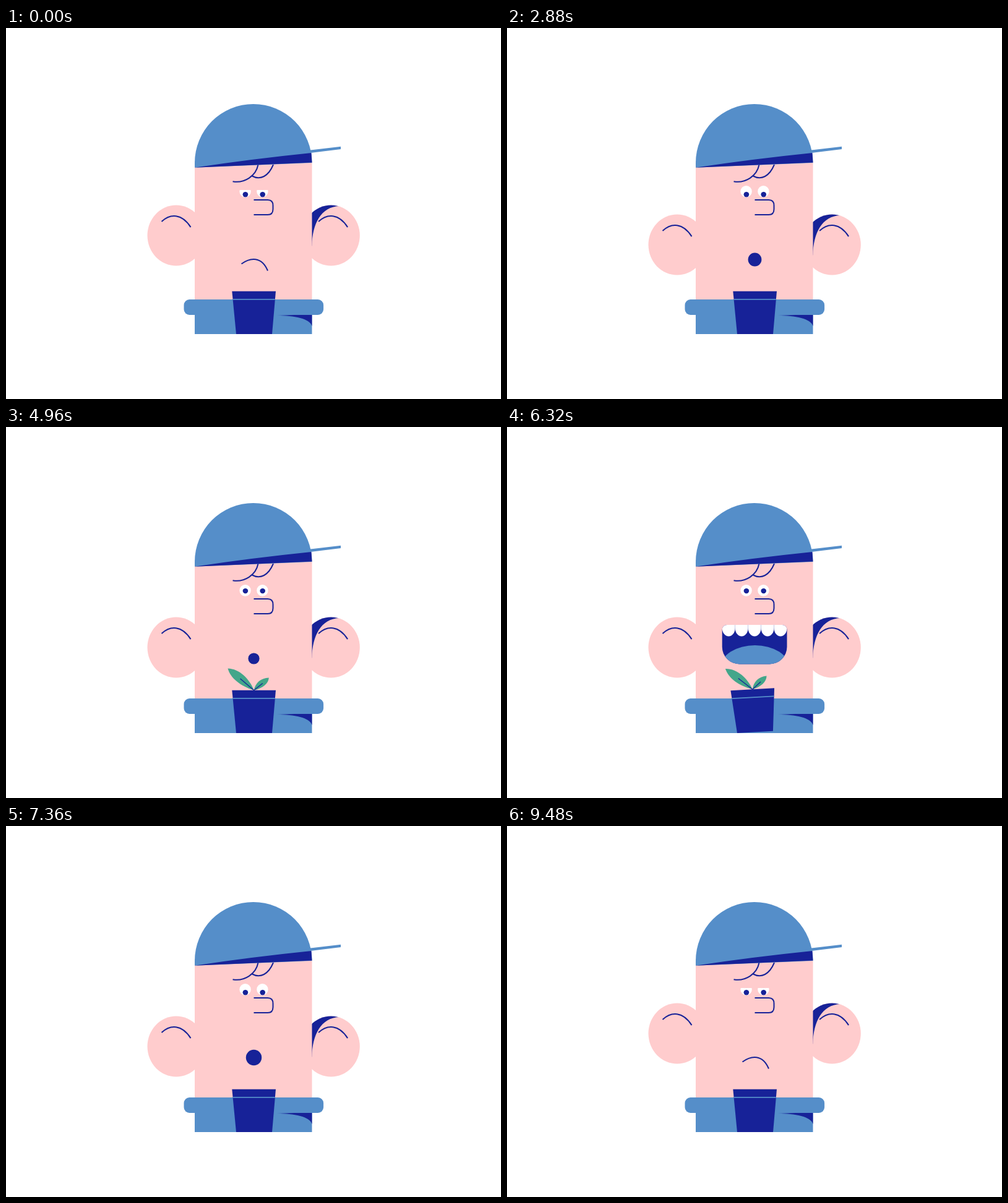
Write an HTML page with a canvas that moves like this. It is 800 by 600 pixels and loops after 9600 ms.

```html
<!DOCTYPE html>
<html lang="en">
<head>
<meta charset="utf-8">
<title>Boy and plant</title>
<style>
  html, body { margin: 0; width: 100%; height: 100%; overflow: hidden; background: #fff; }
  canvas { display: block; }
</style>
</head>
<body>
<canvas id="stage" width="800" height="600"></canvas>
<script>
const ctx = document.getElementById('stage').getContext('2d');
const LOOP = 9600, STEP = 40, TAU = 2 * Math.PI;
const SKIN = '#ffcccd', BLUE = '#558ec9', NAVY = '#172298', GREEN = '#43a68a', WHITE = '#fff';
const BLINKS = [490, 3240, 6840], RATTLES = [1500, 2120, 3120, 7400, 7720];
let now = 0;

const mix = (a, b, p) => a + (b - a) * p;
const span = (start, end) => Math.min(1, Math.max(0, (now - start) / (end - start)));
const sum = (list, f) => list.reduce((total, item) => total + f(item), 0);

// Motion rules: eased step 0..1, single bump, full wave, damped swing.
function go(start, end) {
  const p = span(start, end);
  return p < .5 ? 4 * p ** 3 : 1 - 4 * (1 - p) ** 3;
}
const bump = (start, length) => Math.sin(Math.PI * span(start, start + length));
const wave = (start, length, turns) => Math.sin(TAU * turns * span(start, start + length));
function swing(start) {
  const age = Math.max(0, now - start);
  return Math.exp(-age / 400) * Math.sin(TAU * age / 480);
}

function fill(path, color) {
  ctx.fillStyle = color;
  ctx.fill(new Path2D(path));
}
function stroke(path, color = NAVY, width = 2) {
  ctx.strokeStyle = color;
  ctx.lineWidth = width;
  ctx.stroke(new Path2D(path));
}
function ellipse(x, y, rx, ry, color) {
  ctx.beginPath();
  ctx.ellipse(x, y, rx, ry, 0, 0, TAU);
  ctx.fillStyle = color;
  ctx.fill();
}
function roundRect(x, y, w, h, radii, color) {
  ctx.beginPath();
  ctx.roundRect(x, y, w, h, radii);
  ctx.fillStyle = color;
  ctx.fill();
}
function local(draw) {
  ctx.save();
  draw();
  ctx.restore();
}

function ear(x, lineShift, shaded) {
  const drop = 15 * go(1060, 1960) + 6 * go(2960, 3640) - 21 * go(7340, 8080);
  const height = 49 - bump(3600, 320);
  local(() => {
    ctx.translate(x, 335.6 + drop);
    ellipse(0, 0, 46.5, height, SKIN);
    if (shaded) local(() => {
      ctx.clip();
      fill('M-31 17C-30 -20 -16 -46 13 -47.5L0 -60H-60V17Z', NAVY);
    });
    ctx.translate(lineShift, 0);
    stroke('M-23.5 -22.5C-9.5 -35.6 9 -35.8 23.5 -13.5');
  });
}

function eyes() {
  const open = go(900, 1280) - go(9080, 9480);
  const lid = mix(262 - 8 * open, 274, sum(BLINKS, start => bump(start, 190)));
  const lookUp = go(3400, 3520) - bump(5240, 320) - go(6880, 6960) + go(8000, 8160) - go(8480, 8640);
  local(() => {
    ctx.translate(0, 264.4);
    ctx.scale(1, 1 + .36 * bump(1080, 400));
    ctx.translate(0, -264.4);
    for (const x of [386.6, 414.4]) {
      ellipse(x, 264.4, 9.2, 9.3, WHITE);
      ellipse(x + .3, 269.2 - 4.1 * lookUp, 4.3, 4.2, NAVY);
    }
    ctx.fillStyle = SKIN;
    ctx.fillRect(376, 250, 49, lid - 250);
  });
}

function mouth() {
  if (now < 2480 || now >= 8960) return stroke('M380.5 381.5C395 371 413 369 423 392.5');
  const r = 12.7 * go(2400, 2640) - 3.6 * go(2640, 3120) + 3.6 * go(6600, 7080);
  const open = go(5440, 5880) - go(6680, 7040);
  const x = mix(400.5 - r, 347.7, open), y = mix(374.5 - r, 320, open);
  const w = mix(2 * r, 104.8, open), h = mix(2 * r, 63.5, open);
  const top = mix(r, 8, open), bottom = mix(r, 28, open);
  local(() => {
    roundRect(x, y, w, h, [top, top, bottom, bottom], NAVY);
    if (!open) return;
    ctx.clip();
    ctx.translate(x, y);
    ctx.scale(w / 104.8, h / 63.5);
    ellipse(53, 68 + 40 * (1 - open), 55, 35, BLUE);
    ctx.translate(0, -20 * (1 - open));
    for (let i = 0; i < 5; i++) fill(`M${i * 20.96} 0v5a10.48 13.6 0 0 0 20.96 0v-5Z`, WHITE);
  });
}

function leaf(shape, vein, angle, size) {
  local(() => {
    ctx.rotate(angle * Math.PI / 180);
    ctx.scale(size, size);
    fill(shape, GREEN);
    stroke(vein, NAVY, 1.3);
  });
}

function plantPot() {
  const tilt = 2 * sum(RATTLES, start => wave(start, 320, 2)) - 3.2 * wave(6160, 640, 1);
  const stretch = 1 - .07 * bump(3420, 180) + .058 * bump(3600, 320) - .04 * bump(3920, 160);
  const grown = go(3580, 3740) - go(6640, 6840);
  const perk = 10 * swing(3640) + 6 * swing(5160);
  const pivot = tilt < 0 ? 372 : 430;
  local(() => {
    ctx.translate(pivot, 495 - 7 * bump(3600, 320));
    ctx.rotate(tilt * Math.PI / 180);
    ctx.scale(1, stretch);
    ctx.translate(-pivot, -495);
    if (grown > 0) local(() => {
      ctx.translate(400.7, 425.8);
      leaf('M0 0C-7 -18 -23 -35 -42 -35.5C-38 -20 -22 -7 0 0Z', 'M0 0L-22 -19', perk, grown);
      leaf('M0 0C2 -12 11 -20 24 -20.5C23.5 -11 14 -3.5 0 0Z', 'M0 0L14 -11.5', -perk, grown);
    });
    fill('M365.3 425.7H436L430 495H372Z', NAVY);
    stroke('M366.5 438.8H434.8', BLUE, 1.8);
  });
}

function scene() {
  ctx.fillStyle = WHITE;
  ctx.fillRect(0, 0, 800, 600);
  ear(275, 0, false);
  ear(525.3, 3.3, true);
  fill('M305 215H494.5V445H305Z', SKIN);
  eyes();
  stroke('M366.5 248.3C386 251.5 404 239 407.5 221M398 239.5C411 246.5 424 240 432 221');
  fill('M305 225.7V218A94.75 95 0 0 1 494.5 218Z', BLUE);
  fill('M305 225.7Q400 211.5 493.5 202L494.5 217.5Z', NAVY);
  fill('M492 197.6L541 191.8V196L492 202Z', BLUE);
  stroke('M400.5 278H423Q431.5 278 431.5 287V293Q431.5 302 423 302H400.5');
  mouth();
  fill('M305 450H494.5V495H305Z', BLUE);
  fill('M438 465L494.5 463V482C491 470 466 465 438 465Z', NAVY);
  roundRect(287.5, 439, 225.6, 25, 9, BLUE);
  plantPot();
}

function frame() {
  now = Math.floor(performance.now() % LOOP / STEP) * STEP;
  scene();
  requestAnimationFrame(frame);
}
frame();
</script>
</body>
</html>
```
